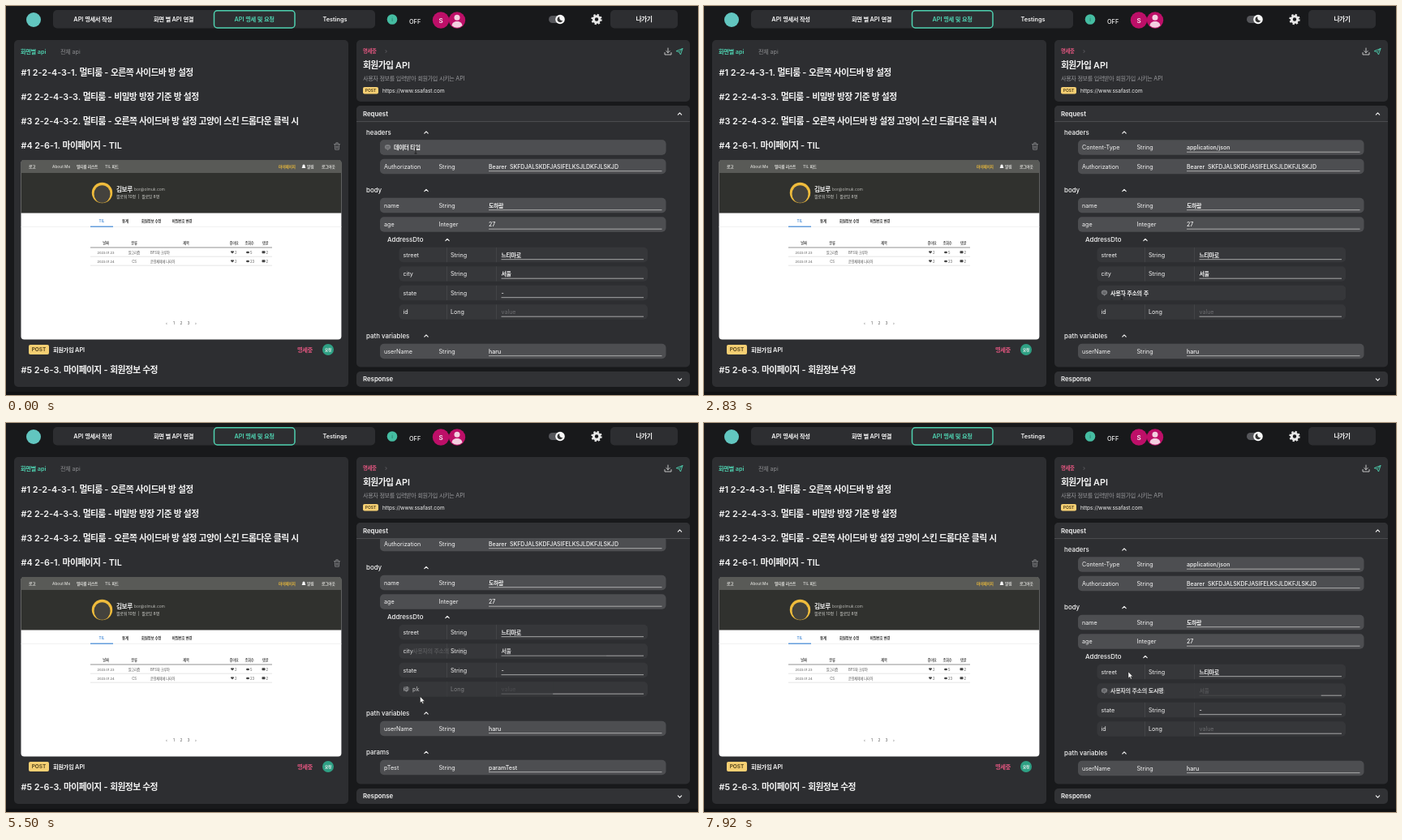
Recreate the animation shown at these times as an HTML page. Size 853 by 480 pixels, loop 8000 ms.

```html
<!DOCTYPE html>
<html lang="ko">
<head>
<meta charset="utf-8">
<title>API 명세 및 요청</title>
<style>
  html, body { margin: 0; width: 100%; height: 100%; overflow: hidden; background: #18191b; }
  svg { display: block; }
  text { font-family: Inter, 'Noto Sans CJK KR', 'Noto Sans CJK', sans-serif; white-space: pre; }
  .ko { letter-spacing: -.055em; }
</style>
</head>
<body>
<svg id="stage" width="853" height="480" viewBox="0 0 853 480"></svg>
<script>
const LOOP = 8000, SCROLL = 49, WIPE = 400, FADE = 300;
const PANEL = '#2d2e31', TEAL = '#4fd1b0', PINK = '#e0567f', WHITE = '#f4f4f4', MAGENTA = '#bd0f68';

// ---------- drawing helpers ----------
// Hangul is set tighter, and bold from medium weight up
const text = (x, y, s, size, fill = WHITE, weight = 400, anchor = 'start') =>
  `<text x="${x}" y="${y}" font-size="${size}" fill="${fill}" font-weight="${weight}" text-anchor="${anchor}">` +
  s.replace(/[가-힣]+/g, `<tspan class="ko" font-weight="${weight < 500 ? 400 : 700}">$&</tspan>`) + '</text>';
const mid = (x, y, s, size, fill, weight) => text(x, y, s, size, fill, weight, 'middle');
const box = (x, y, w, h, fill, r = 0, extra = '') =>
  `<rect x="${x}" y="${y}" width="${w}" height="${h}" rx="${r}" fill="${fill}" ${extra}/>`;
const dot = (x, y, r, fill) => `<circle cx="${x}" cy="${y}" r="${r}" fill="${fill}"/>`;
const oval = (x, y, rx, ry, fill) => `<ellipse cx="${x}" cy="${y}" rx="${rx}" ry="${ry}" fill="${fill}"/>`;
const line = (x1, y, x2, stroke, w = .8) => `<path d="M${x1} ${y}H${x2}" stroke="${stroke}" stroke-width="${w}"/>`;
const stroke = (d, color, w = 1) =>
  `<path d="${d}" fill="none" stroke="${color}" stroke-width="${w}" stroke-linecap="round" stroke-linejoin="round"/>`;
const fill = (d, color) => `<path d="${d}" fill="${color}"/>`;
const caret = (x, y, up = true) => {
  const h = up ? 1.2 : -1.2;
  return stroke(`M${x - 2.2} ${y + h}L${x} ${y - h}L${x + 2.2} ${y + h}`, WHITE, 1.1);
};
const badge = (x, y, w, h, size) =>
  box(x, y, w, h, '#f5cf73', 2) + mid(x + w / 2, y + h / 2 + size * .36, 'POST', size, '#4a3c17', 600);

// ---------- fixed parts ----------
function topBar() {
  const tabs = ['API 명세서 작성', '화면 별 API 연결', 'API 명세 및 요청', 'Testings'];
  let s = dot(34, 17, 9, '#62c6c0') + box(58, 5, 397, 22.5, PANEL, 5);
  s += box(256.5, 5.8, 99.5, 21.2, 'none', 4, `stroke="${TEAL}" stroke-width="1.5"`);
  tabs.forEach((t, i) => s += mid(107 + i * 99.5, 19.3, t, 7.3, i === 2 ? TEAL : WHITE, 600));
  s += dot(476, 16.5, 6.3, '#45bda2') + mid(476, 19, 'i', 6.5, '#2a7f6d', 600);
  s += text(497, 21.5, 'OFF', 7.3, WHITE, 500);
  s += dot(536, 17.5, 10.2, MAGENTA) + mid(536, 20.5, 'S', 8, WHITE, 600);
  s += dot(556, 17.5, 10.2, MAGENTA) + dot(556, 14.3, 3.5, '#f3cfe0') +
    fill('M549.6 24.2c0-7 12.8-7 12.8 0q-6.4 5-12.8 0z', '#f3cfe0');
  s += box(669, 12, 19, 9, '#55565a', 4.5) + dot(683, 16.5, 5.8, '#f7f7f7') +
    fill('M682.5 13.2a3.5 3.5 0 1 0 3.8 4.6a3.3 3.3 0 0 1-3.8-4.6z', '#333');
  s += '<g fill="none" stroke="#e8e8e8"><circle cx="728" cy="16.5" r="5.5" stroke-width="2.4" stroke-dasharray="2.16"/>' +
    '<circle cx="728" cy="16.5" r="3.7" stroke-width="3"/></g>';
  return s + box(745, 5, 83, 22.5, PANEL, 5) + mid(786.5, 18.5, '나가기', 7.8, WHITE, 600);
}

function preview() {
  const pale = '#dcdcd8', ink = '#555', top = 'V194q0-4 4-4H409.4q4 0 4 4V';
  let s = box(18.5, 190, 394.9, 221.6, '#fff', 4) + fill(`M18.5 255.5${top}255.5z`, '#30312e') +
    fill(`M18.5 206${top}206z`, '#595a57');
  [[28, '로고'], [57, 'About Me'], [87, '멀티룸 리스트'], [122, 'TIL 피드'], [371, '알림'], [389, '로그아웃']]
    .forEach(([x, t]) => s += text(x, 199.8, t, 4.8, pale, 500));
  s += text(336, 199.8, '마이페이지', 4.8, '#e3b53c', 500) + fill('M364.5 200q1-1 1-3a1.5 1.5 0 0 1 3 0q0 2 1 3z', '#fff');
  s += dot(118.5, 230.5, 12.7, '#efbb3c') + oval(118.5, 232, 10, 10.8, '#44423d');
  s += text(136, 228.5, '김보루', 7.6, WHITE, 600) + text(158, 228, 'bor@olmuk.com', 4.9, '#b9b9b5');
  s += text(136, 237.3, '팔로워 10명  |  팔로잉 8명', 5, '#d0d0cc');
  [[118, 'TIL', '#3f87d6'], [147, '통계', '#333'], [179, '회원정보 수정', '#333'], [217, '비밀번호 변경', '#333']]
    .forEach(([x, t, c]) => s += mid(x, 266.5, t, 4.5, c, 600));
  s += line(18.5, 272.5, 413.4, '#ececec', .7) + line(104, 272.2, 132, '#3f87d6', 1.2);
  const cols = [123, 158, 222, 281, 300, 319.5];
  ['날짜', '분류', '제목', '좋아요', '조회수', '댓글'].forEach((t, i) => s += mid(cols[i], 293.8, t, 4.3, ink, 500));
  s += line(104, 298, 328, '#777');
  [['2023.01.23', '알고리즘', 'BFS와 크루야', 2, 5, 2], ['2023.01.24', 'CS', '운영체제에 나타아', 2, 23, 2]].forEach((r, i) => {
    const y = 305.5 + i * 11;
    s += mid(cols[0], y, r[0], 4, ink) + mid(cols[1], y, r[1], 4.2, ink) + text(178, y, r[2], 4.2, ink);
    s += fill(`M279 ${y}l-2-2q0-2 2-1q2-1 2 1z`, '#444') + oval(298, y - 1.5, 2, 1.3, '#444') + box(315.5, y - 3.3, 4, 3, '#444', .6);
    [282, 301, 320.5].forEach((x, k) => s += text(x, y, String(r[3 + k]), 4.2, ink));
    s += line(104, y + 3.7, 328, '#d5d5d5', .6);
  });
  ['‹', '1', '2', '3', '›'].forEach((t, i) => s += mid(198 + i * 9, 392.5, t, 4.8, ink));
  return s;
}

function leftPanel() {
  let s = box(10, 42, 412, 428, PANEL, 5);
  s += text(18, 59, '화면별 api', 7.3, TEAL, 600) + text(67, 59, '전체 api', 7.2, '#8b8c8f');
  [[85.7, '#1 2-2-4-3-1. 멀티룸 - 오른쪽 사이드바 방 설정'],
   [116, '#2 2-2-4-3-3. 멀티룸 - 비밀방 방장 기준 방 설정'],
   [146.2, '#3 2-2-4-3-2. 멀티룸 - 오른쪽 사이드바 방 설정 고양이 스킨 드롭다운 클릭 시'],
   [176.4, '#4 2-6-1. 마이페이지 - TIL'],
   [453.4, '#5 2-6-3. 마이페이지 - 회원정보 수정']].forEach(([y, t]) => s += text(18.5, y, t, 10.8, WHITE, 600));
  s += stroke('M404.5 170.5h7M406.8 170v-1.3h2.4V170M405.3 171l.4 6.2h4.6l.4-6.2M407.2 172.5v3M408.8 172.5v3', '#8b8c8f', .8);
  s += preview() + badge(28, 418, 25, 12, 6.5) + text(58, 426.8, '회원가입 API', 7.3, WHITE, 600);
  s += text(359, 426.8, '명세중', 7.3, PINK, 600);
  return s + dot(397, 424, 7, '#2fa084') + mid(397, 425.8, '요청', 4.6, WHITE, 500);
}

function infoPanel() {
  return box(432, 42, 411, 76, PANEL, 5) + text(440, 58, '명세중', 6.4, PINK, 500) +
    stroke('M468 54.5l1.3 1.5l-1.3 1.5', '#6d6e71', .7) +
    text(440, 77, '회원가입 API', 10.8, WHITE, 600) +
    text(440, 92, '사용자 정보를 입력받아 회원가입 시키는 API', 7.1, '#96979a') +
    badge(440, 100, 19, 8.5, 5) + text(464, 106.7, 'https://www.ssafast.com', 6.5, WHITE) +
    stroke('M816 52v5.5M813.8 55.5l2.2 2.2l2.2-2.2M812 57.5v2.5h8v-2.5', '#d5d5d5', .9) +
    stroke('M826.5 55.5l7.5-3l-2.5 7.5l-1.8-3.2zM829.7 56.8l4.3-4.3', TEAL, .9);
}

// ---------- request form ----------
const rows = [
  [174.5, 'Content-Type', 'String', 'application/json', '데이터 타입'],
  [198, 'Authorization', 'String', 'Bearer\u00a0 SKFDJALSKDFJASIFELKSJLDKFJLSKJD', '인증 토큰'],
  [246, 'name', 'String', '도하람', '사용자 이름'],
  [269.5, 'age', 'Integer', '27', '사용자 나이'],
  [307, 'street', 'String', '느티마로', '사용자 주소의 도로명', 1],
  [330.5, 'city', 'String', '서울', '사용자의 주소의 도시명', 1],
  [354, 'state', 'String', '-', '사용자 주소의 주', 1],
  [377.5, 'id', 'Long', '', 'pk', 1],
  [426, 'userName', 'String', 'haru', '사용자 이름'],
  [474, 'pTest', 'String', 'paramTest', '쿼리 파람 테스트용도']
].map(([y, key, type, value, note, nested]) => nested
  ? { y, key, type, value, note, nested, x: 484.5, w: 306.5, typeX: 548, valueX: 610.5, end: 786, bg: '#36373a' }
  : { y, key, type, value, note, x: 461, w: 352.5, typeX: 533.5, valueX: 595, end: 808.5, bg: '#4d4e51' });

const heads = [[444, 156, 'headers', 518], [444, 227.5, 'body', 518], [470, 288.5, 'AddressDto', 544],
  [444, 407, 'path variables', 518], [444, 455.5, 'params', 518]];

function rowMarkup(r, i) {
  const top = r.y - 9.2, base = r.y + 2.5, ix = r.nested ? 493.5 : 470.5;
  let s = box(r.x, top, r.w, 18.4, r.bg, 5);
  if (r.nested) s += stroke(`M543.5 ${top + .5}v17.4M604.5 ${top + .5}v17.4`, '#47484b', .8);
  s += text(r.x + 5, base, r.key, 7.2) + text(r.typeX, base, r.type, 7.2);
  s += r.value ? text(r.valueX, base, r.value, 7, WHITE, 500) : text(r.valueX, base, 'value', 7.1, '#6b6c6f');
  s += line(r.valueX, r.y + 5.7, r.end, '#c4c4c4');
  // the hover note wipes over the row inside a clipping viewport
  s += `<svg id="note${i}" x="${r.x}" y="${top}" width="0" height="18.4"><g transform="translate(${-r.x} ${-top})">` +
    box(r.x, top, r.w, 18.4, r.bg, 5) + oval(ix, r.y - .4, 3.7, 3, '#7d7e81') +
    fill(`M${ix - 1} ${r.y + 2}l1 2l1.5-2z`, '#7d7e81') + stroke(`M${ix - 1.6} ${r.y - 1}h3.2M${ix - 1.6} ${r.y + .5}h3.2`, r.bg, .5) +
    text(ix + 7.5, base, r.note, 7.1, WHITE, 500) + '</g></svg>';
  return s;
}

function requestPanel() {
  return box(432, 123, 411, 322.5, PANEL, 5) +
    '<clipPath id="view"><rect x="432" y="142.5" width="411" height="303"/></clipPath><g clip-path="url(#view)"><g id="form">' +
    heads.map(([x, y, t, cx]) => text(x, y + 2.7, t, 7.9, WHITE, 500) + caret(cx, y)).join('') +
    rows.map(rowMarkup).join('') + '</g></g>' +
    box(432, 123, 411, 19.5, '#313235', 5) + line(432, 142.6, 843, '#55565a') +
    text(440, 135.7, 'Request', 7.8, WHITE, 600) + caret(830.5, 133) +
    box(432, 451, 411, 19, '#313235', 5) + text(440, 463.3, 'Response', 7.8, WHITE, 600) + caret(830.5, 461, false);
}

const pointers = {
  arrow: '<path d="M0 0v7.8l1.8-1.6l1.3 2.9l1.3-.6l-1.3-2.8h2.5z" fill="#fff" stroke="#222" stroke-width=".5"/>',
  hand: '<path d="M-.8 0q.8-.9 1.6 0v3l3 .8q1 .4.7 1.8l-.6 2.9h-4l-2.4-3.2q.4-1 1.7 0z" fill="#fff" stroke="#222" stroke-width=".5"/>',
  beam: stroke('M-1.2-4h2.4M0-4v8M-1.2 4h2.4', '#161616', .7)
};

const stage = document.getElementById('stage');
stage.innerHTML = box(0, 0, 853, 480, '#18191b') + box(0, 476, 853, 4, '#111214') +
  topBar() + leftPanel() + infoPanel() + requestPanel() +
  '<g id="mouse">' + Object.entries(pointers).map(([k, d]) => `<g id="${k}">${d}</g>`).join('') + '</g>';

const get = id => document.getElementById(id);
const form = get('form'), mouse = get('mouse'), notes = rows.map((_, i) => get('note' + i));
const shapes = Object.keys(pointers).map(get);

// ---------- motion ----------
// pointer stops: time, x, y
const path = [
  [0, 505, 178], [200, 505, 184], [290, 505, 192], [560, 503, 208], [830, 503, 219], [890, 503, 238], [970, 502, 262],
  [1250, 501.5, 275.5], [1420, 503, 279], [1780, 508, 298], [2060, 510, 319], [2400, 513, 344], [2700, 515, 358], [3080, 515, 358],
  [3250, 512, 369], [4050, 504, 387], [4170, 504, 405], [4300, 505, 418], [4600, 506, 426], [4920, 506, 426], [5070, 508, 278],
  [5260, 509, 290], [5390, 510, 320], [5500, 510.5, 337.5], [5760, 506, 368], [6050, 503, 386], [6300, 500, 416],
  [6830, 498, 428.5], [7100, 499, 428], [7180, 500, 408], [7500, 508, 396], [7690, 518, 339], [7905, 523, 315], [7920, 523, 307]
];
// row, pointer enters, pointer leaves
const hovers = [
  [0, -500, 200], [1, 270, 560], [2, 885, 970], [3, 974, 1420], [4, 1780, 2060], [5, 2065, 2400], [6, 2400, 3200],
  [7, 3250, 4050], [8, 4300, 4950], [5, 5080, 5260], [7, 5390, 5500], [8, 5760, 6050], [9, 6300, 7120], [5, 7690, 7905]
];

const clamp = v => Math.max(0, Math.min(1, v));
const smooth = v => (v = clamp(v), v * v * (3 - 2 * v));
const easeOut = v => 1 - (1 - clamp(v)) ** 3;

function pointerAt(t) {
  const i = path.findIndex(p => p[0] > t);
  if (i < 0) return path[path.length - 1].slice(1);
  const a = path[i - 1], b = path[i], k = smooth((t - a[0]) / (b[0] - a[0]));
  return [a[1] + (b[1] - a[1]) * k, a[2] + (b[2] - a[2]) * k];
}

function draw(t) {
  const scroll = SCROLL * (smooth((t - 4930) / 220) - smooth((t - 7220) / 260));
  form.setAttribute('transform', `translate(0 ${-scroll})`);

  const [x, y] = pointerAt(t);
  const state = rows.map(() => [0, 0]);
  let shape = heads.some(h => Math.abs(h[1] - scroll - y) < 8) ? 'hand' : 'arrow';
  for (const [i, start, end] of hovers) {
    if (t < start || t > end + FADE) continue;
    const wipe = easeOut((Math.min(t, end) - start) / WIPE);
    state[i] = [wipe, wipe * (1 - clamp((t - end) / FADE))];
    if (t < end && Math.abs(rows[i].y - scroll - y) < 5) shape = 'beam';
  }
  state.forEach(([wipe, alpha], i) => {
    notes[i].setAttribute('width', rows[i].w * wipe);
    notes[i].setAttribute('opacity', alpha);
  });
  mouse.setAttribute('transform', `translate(${x} ${y})`);
  shapes.forEach(g => g.setAttribute('visibility', g.id === shape ? 'visible' : 'hidden'));
}

const began = performance.now();
function tick() {
  draw((performance.now() - began) % LOOP);
  requestAnimationFrame(tick);
}
tick();
</script>
</body>
</html>
```
